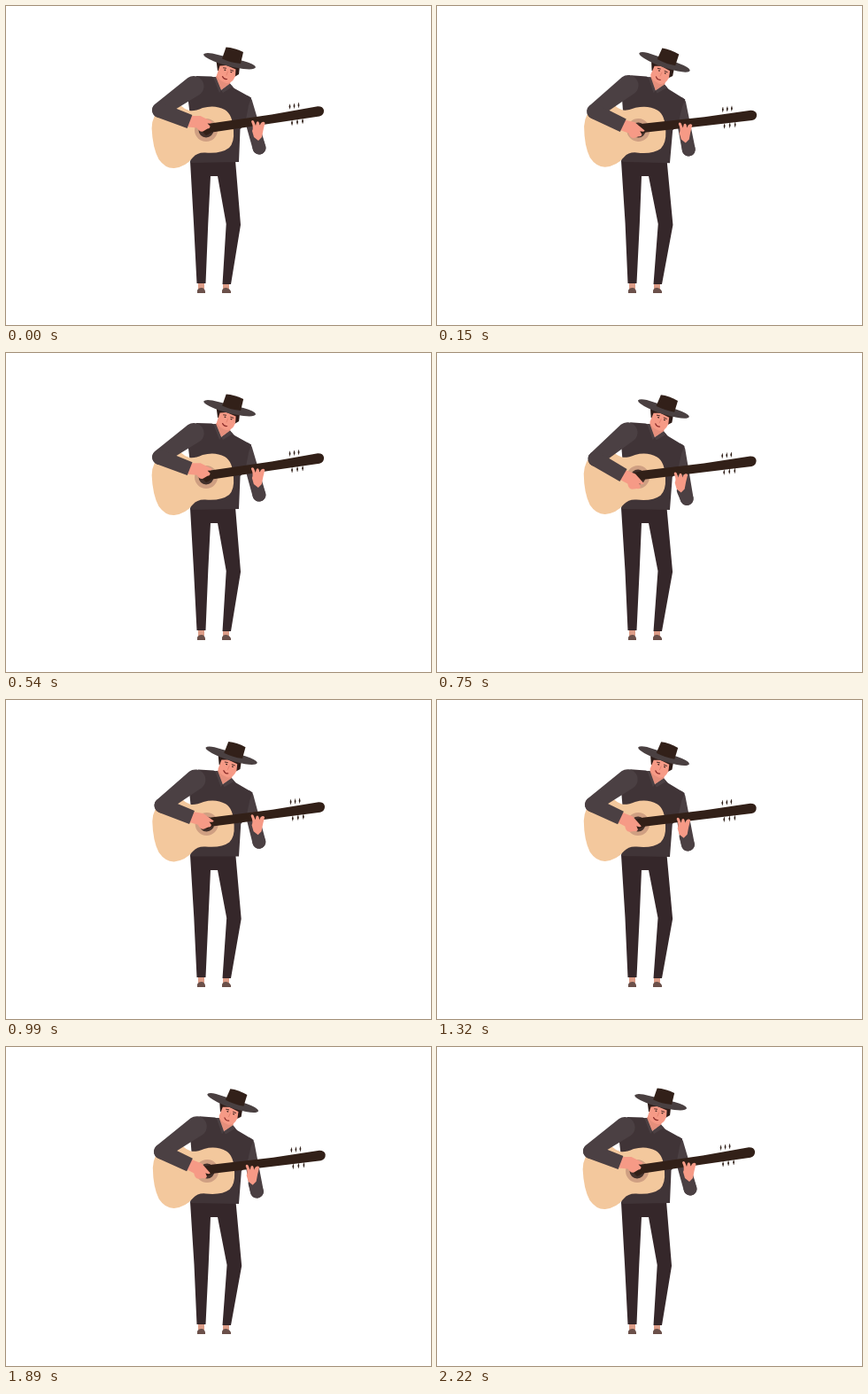
Animation of 480 by 360 pixels, one loop 2250 ms. Source, as an HTML page:

```html
<!DOCTYPE html>
<html lang="en">
<head>
<meta charset="utf-8">
<title>Guitar player</title>
<style>
html, body { margin: 0; width: 100%; height: 100%; overflow: hidden; background: #fff; }
svg { display: block; width: 100vw; height: 100vh; }
</style>
</head>
<body>
<svg viewBox="0 0 480 360">
  <g fill="#6b504a">
    <path d="M217 312h7v7h-7zM245 312h7v7h-7z" fill="#dc9c87"/>
    <path d="M216 324v-3q1-3 5-3q3 0 4 4v2zM244 324v-3q1-3 4-3q4 0 6 4v2z"/>
  </g>
  <path id="legs" fill="#35272a"/>
  <path id="upperL" fill="#4b4043"/>
  <g id="torso">
    <path d="M215 79L232 79.5L237 81L243 95L253 88L258 93L277 103.500L274 112L270 133L264.500 139L263 176L208 177L211 150L205 100z" fill="#403437"/>
    <path d="M240 76L236 81L243 95L253 88L254 83z" fill="#e58f7c"/>
    <path d="M234 80L237 80L243 95L241 98zM253 87.500L256 91L245 98L243 95z" fill="#4b4043"/>
    <g id="head">
      <path d="M237.500 62L264 68L263 77L258 80L239 73z" fill="#2e1c18"/>
      <path d="M241.500 67.500L249 67L259.500 71.500L259 79Q255.500 88 248.500 87Q238.500 83 238 78z" fill="#f69a86"/>
      <g fill="none" stroke="#3a211d" stroke-linecap="round">
        <path d="M245.500 69.800l3 .4M253.500 72.200l3.200 1" stroke-width=".9"/>
        <path d="M247 72.200l.7.200M254 74.500l.7.200" stroke-width="1.300"/>
        <path d="M250.500 74l-1.500 4" stroke="#df7d6b" stroke-width=".8"/>
        <path d="M244.500 79.500q1.500 3.500 5 3" stroke="#8c2e2b" stroke-width="1.200"/>
      </g>
      <path d="M223 54.500Q225 52 233 53.500L268 62Q281 65.500 282 69Q281 72.500 268 71Q249 68.500 235 62.500Q223 57.500 223 54.500z" fill="#4a4041"/>
      <path d="M248.500 46.500Q258 47 268 52L265 65Q254 64 244 59.500z" fill="#322019"/>
    </g>
  </g>
  <path id="foreL" fill="#4b4043"/>
  <g id="guitar">
    <path d="M176 115Q165 122 164.600 138Q165.500 160 172.500 173Q180 183.500 190 183Q203 181.500 211 171Q216 165 225 165.500Q243 167 252 160Q258 154 257 141Q256 122 247 117Q236 111 222 115Q213 119 207 118Q201 116 197 112z" fill="#f3c89d"/>
    <circle cx="226" cy="140" r="13" fill="#cf9f82"/>
    <circle cx="226" cy="140" r="8.500" fill="#42302b"/>
    <path d="M222 135L231 132.500L300 122.500L352 113.200Q358 113 359 117.500Q359.500 123 354 124.500L300 132.500L233 142.500L226 146L221 141z" fill="#322018"/>
    <g id="pegs" fill="#30201a"></g>
  </g>
  <path id="handL" d="M277 130.500Q278 128 280 130L282 135L283 131Q285 129 286 132L286.500 135L288 132Q291 129.500 292.500 132L290.500 140L289 148L285 152L280 148L278 141Q280 137 277 130.500z" fill="#f69a86"/>
  <path id="handR" d="M-2 -6.500L12 -6.500L19 -3L25 0Q25 2 20 2L23 5Q23 8 20 8L15 11Q11 12 8 7L-2 6z" fill="#f69a86"/>
  <path id="upperR" fill="#4b4043"/>
  <path id="foreR" fill="#4b4043"/>
</svg>
<script>
const LOOP = 2250, STEP = 30, BEAT = LOOP / 4;
const HIP = [236, 176];
const $ = id => document.getElementById(id);
const put = (id, name, value) => $(id).setAttribute(name, value);

// Elbow x, y, wrist x, y, hand angle, fret slide
const REST = [173.5, 117.5, 207.5, 130.5, 0, 0];
const LOW = [182, 120.5, 213, 139, 27, 1];
const MID = [175.5, 118, 207.5, 133, 22, 0.75];
const keys = [
  [0, REST],
  [300, LOW],
  [BEAT, REST],
  [750, [179, 119.5, 210.5, 138, 22, 1.1]],
  [990, [176, 119, 210, 132.5, 9, 0.05]],
  [2 * BEAT, REST],
  [1320, MID],
  [1420, MID],
  [3 * BEAT, REST],
  [1890, MID],
  [1990, MID],
  [2220, REST],
  [LOOP, REST]
];

const pegs = [[320.5, 113.5], [325.5, 112.7], [330.5, 111.9], [323, 132], [329, 131], [335, 130]];
$("pegs").innerHTML = pegs.map(([x, y]) =>
  `<ellipse cx="${x}" cy="${y}" rx=".9" ry="1.7"/><path d="M${x - .3} ${y - 2.8}h.7v5.6h-.7z"/>`).join("");

function armPose(t) {
  let i = 1;
  while (keys[i][0] < t) i++;
  const [t0, a] = keys[i - 1], [t1, b] = keys[i];
  const k = (1 - Math.cos(Math.PI * (t - t0) / (t1 - t0))) / 2;
  return a.map((v, n) => v + (b[n] - v) * k);
}

function sway(t) {
  const s = Math.sin(Math.PI * t / BEAT) ** 2;
  return s * (t < BEAT ? 1.05 : 0.58);
}

function turn([x, y], deg) {
  const r = deg * Math.PI / 180, dx = x - HIP[0], dy = y - HIP[1];
  return [HIP[0] + dx * Math.cos(r) - dy * Math.sin(r), HIP[1] + dx * Math.sin(r) + dy * Math.cos(r)];
}

// Tapered limb, round at the start and optionally at the end
function limb([ax, ay], ra, [bx, by], rb, flat) {
  const d = Math.hypot(bx - ax, by - ay), nx = (ay - by) / d, ny = (bx - ax) / d;
  const end = `${bx - nx * rb} ${by - ny * rb}`;
  return `M${ax + nx * ra} ${ay + ny * ra}L${bx + nx * rb} ${by + ny * rb}` +
    (flat ? `L${end}` : `A${rb} ${rb} 0 0 0 ${end}`) +
    `L${ax - nx * ra} ${ay - ny * ra}A${ra} ${ra} 0 0 0 ${ax + nx * ra} ${ay + ny * ra}z`;
}

function draw(t) {
  const p = sway(t), tilt = 4.6 * p;
  const [ex, ey, wx, wy, angle, s] = armPose(t);

  put("legs", "d", `M208 ${175 - p}L${212 + p} 245L215.500 313H225.500L${228.300 + p} 245L231 192H239` +
    `L${248.700 + 1.800 * p} 246L244.500 314H254L${265 + 2.500 * p} 247L${259 + p} 174z`);
  put("torso", "transform", `rotate(${tilt} ${HIP})`);
  put("head", "transform", `translate(${-3 * p} 0) rotate(${4 * p} 245 86)`);
  put("guitar", "transform", `translate(${2.4 * p} 0) rotate(${3.5 * p} 226 140)`);

  const elbowL = [286 - 3.5 * s, 160 + 4 * s];
  put("upperL", "d", limb(turn([271, 108], tilt), 7, elbowL, 7.5));
  put("foreL", "d", limb(elbowL, 7.5, [285 - 8 * s, 151 + 4 * s], 5.5));
  put("handL", "transform", `translate(${-8.5 * s} ${5 * s})`);

  put("upperR", "d", limb(turn([212, 90.5], tilt), 11.5, [ex, ey], 8.5));
  put("foreR", "d", limb([ex, ey], 8.5, [wx, wy], 8, true));
  put("handR", "transform", `translate(${wx} ${wy}) rotate(${angle})`);
}

const start = performance.now();
function tick() {
  const t = (performance.now() - start) % LOOP;
  draw(Math.floor(t / STEP) * STEP);
  requestAnimationFrame(tick);
}
draw(0);
tick();
</script>
</body>
</html>
```
